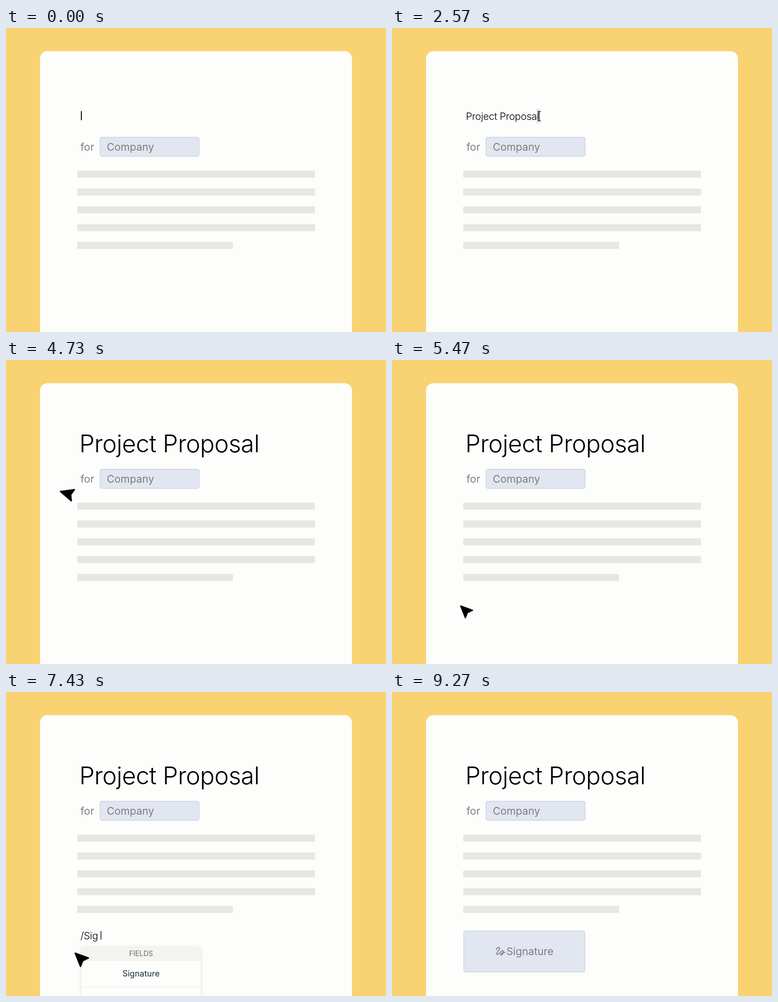
These frames come from a looping animation (837x669 px, 9.31 s). An HTML page:

```html
<!DOCTYPE html>
<html lang="en">
<head>
<meta charset="utf-8">
<title>Proposal editor</title>
<style>
  html, body { margin: 0; width: 100%; height: 100%; overflow: hidden; background: #f9d272; }
  svg { display: block; width: 837px; height: 669px; font-family: Inter, "Open Sans", sans-serif; }
  .grey { fill: #7d7d7d; font-size: 23px; }
  .field { fill: #e1e6f0; stroke: #c5d0e8; stroke-width: 1.3; }
  .navy { fill: #14303f; }
  .line { fill: none; stroke: #14303f; stroke-width: 2; }
  .mid { text-anchor: middle; }
  .typed { font-weight: 300; font-size: 22px; letter-spacing: -.016em; }
  .typed.big { font-size: 53.5px; letter-spacing: -.01em; }

  .anim { animation: 9310ms linear infinite both; }
  #select { fill: #e0e5f0; animation-name: select; }
  #beam { animation-name: beam; }
  #bar { animation-name: bar; }
  #menu { animation-name: menu; }
  #sign { animation-name: sign; }
  #move { animation-name: move; }
  #tilt { animation-name: tilt; }

  /* the selection grows leftwards, then covers the heading */
  @keyframes select {
    0%, 27.17% { x: 326px; y: 178px; width: 0; height: 32px; animation-timing-function: ease-in-out; }
    30.08%, 41.13% { x: 163px; y: 178px; width: 163px; height: 32px; animation-timing-function: step-end; }
    41.14%, 45.64% { x: 163px; y: 152px; width: 403px; height: 66px; animation-timing-function: step-end; }
    45.65%, 100% { x: 163px; y: 152px; width: 0; height: 66px; }
  }
  @keyframes beam {
    0%, 23.6% { opacity: 0; translate: 352px 214px; }
    23.7% { opacity: 1; translate: 352px 214px; animation-timing-function: ease-in-out; }
    26.3%, 27.17% { opacity: 1; translate: 332px 194px; animation-timing-function: ease-in-out; }
    30.08%, 30.7% { opacity: 1; translate: 164px 194px; }
    30.71%, 100% { opacity: 0; translate: 164px 194px; }
  }
  @keyframes bar {
    0%, 29.6% { opacity: 0; translate: 0 6px; animation-timing-function: ease-out; }
    31.5%, 44.2% { opacity: 1; translate: 0 0; }
    45.7%, 100% { opacity: 0; translate: 0 0; }
  }
  @keyframes menu {
    0%, 70.2% { opacity: 0; translate: 0 8px; animation-timing-function: ease-out; }
    72%, 88.4% { opacity: 1; translate: 0 0; }
    89.5%, 100% { opacity: 0; translate: 0 0; }
  }
  @keyframes sign {
    0%, 89.2% { opacity: 0; }
    90.8%, 100% { opacity: 1; }
  }
  @keyframes move {
    0%, 30.7% { opacity: 0; translate: 163px 200px; }
    30.71%, 32.2% { opacity: 1; translate: 163px 200px; animation-timing-function: ease-in; }
    37.59% { translate: 111px 144px; animation-timing-function: ease-out; }
    39.7%, 46.08% { translate: 97px 122px; animation-timing-function: ease-in-out; }
    56.82%, 63.4% { translate: 150px 540px; animation-timing-function: ease-in-out; }
    67.7%, 78.4% { translate: 140px 570px; animation-timing-function: ease-in-out; }
    85.9%, 91% { opacity: 1; translate: 292px 617px; }
    92.8%, 100% { opacity: 0; translate: 292px 617px; }
  }
  @keyframes tilt {
    0%, 39.8% { rotate: 0deg; scale: 1; }
    40.7% { scale: .86; }
    41.8%, 46.08% { rotate: 0deg; scale: 1; animation-timing-function: ease-in-out; }
    50.8% { rotate: -27.5deg; scale: 1; animation-timing-function: ease-in-out; }
    56.82%, 58% { rotate: 0deg; scale: 1; }
    59% { scale: .86; }
    60%, 86.5% { rotate: 0deg; scale: 1; }
    87.6% { scale: .9; }
    88.8%, 100% { rotate: 0deg; scale: 1; }
  }
</style>
</head>
<body>
<svg viewBox="0 0 837 669">
  <defs>
    <filter id="shadow" x="-10%" y="-30%" width="120%" height="170%">
      <feDropShadow dx="0" dy="2" stdDeviation="3" flood-color="#556" flood-opacity=".22"/>
    </filter>
  </defs>

  <rect x="75" y="51" width="687" height="660" rx="16" fill="#fdfdfb"/>
  <g id="lines" fill="#e6e7e5"></g>
  <text class="grey" x="164" y="269.5">for</text>
  <rect class="field" x="207" y="240.5" width="218.5" height="42" rx="4"/>
  <text class="grey" x="222" y="270">Company</text>

  <rect id="select" class="anim"/>
  <text id="title" class="typed"></text>
  <rect id="titleCaret" y="183" width="2" height="20"/>
  <text id="command" class="typed" x="164" y="543.5"></text>
  <rect id="commandCaret" y="526" width="1.5" height="19"/>

  <g id="sign" class="anim">
    <rect class="field" x="158" y="526" width="267" height="90" rx="4"/>
    <path d="M230 567C231 562 237 560 237 564C237 569 229 573 231 577C234 580 240 569 244 569C248 570 243 579 240 579C237 578 242 573 249 573"
      fill="none" stroke="#7d7d7d" stroke-width="2" stroke-linecap="round"/>
    <text class="grey" x="252" y="579">Signature</text>
  </g>

  <g id="menu" class="anim">
    <rect x="166" y="560" width="263" height="160" rx="8" fill="#fdfdfb" filter="url(#shadow)"/>
    <path d="M166 592V568a8 8 0 0 1 8-8H421a8 8 0 0 1 8 8V592Z" fill="#f3f3f0"/>
    <rect x="166" y="648" width="263" height="1.5" fill="#efefed"/>
    <text class="mid" x="297.5" y="581" font-size="15.5" fill="#6c6c6c">FIELDS</text>
    <text class="mid navy" x="297.5" y="626" font-size="18.2">Signature</text>
  </g>

  <g id="bar" class="anim">
    <rect x="53" y="93" width="732" height="53" rx="12" fill="#fdfdfb" filter="url(#shadow)"/>
    <rect x="499" y="93" width="72" height="53" fill="#eddad3"/>
    <g class="mid navy" font-size="20">
      <text x="90" y="126.5" fill="#151515">H1</text>
      <text x="166.5" y="126.5">H2</text>
      <text x="245" y="126.5">H3</text>
      <text x="320" y="124.5" font-size="17" font-weight="800">B</text>
    </g>
    <path class="line" transform="translate(391.5 118)" stroke-width="2.5" d="M-1.5-5h7M-5.5 5h7M2.3-5L-2.3 5"/>
    <path class="line" transform="translate(463 119)" d="M-1.5-4h-3a4 4 0 0 0 0 8h3M1.5-4h3a4 4 0 0 1 0 8h-3M-4 0h8"/>
    <g id="aligns"></g>
    <path class="navy" transform="translate(739 107.5) scale(.92)"
      d="M3.27 5L2 6.27l6.97 6.97L6.5 19h3l1.57-3.66L16.73 21 18 19.73 3.55 5.27zM6 5v.18L8.82 8h2.4l-.72 1.68 2.1 2.1L14.21 8H20V5z"/>
  </g>

  <g id="beam" class="anim">
    <path d="M-3.5-10.5Q0-10.5 0-8.5V8.5Q0 10.5-3.5 10.5M3.5-10.5Q0-10.5 0-8.5M0 8.5Q0 10.5 3.5 10.5"
      fill="none" stroke="#000" stroke-width="1.4"/>
  </g>
  <g id="move" class="anim">
    <g id="tilt" class="anim">
      <path d="M1.5 1.5L30.5 12L18 18L13 30.5Z" stroke="#000" stroke-width="3" stroke-linejoin="round"/>
    </g>
  </g>
</svg>
<script>
  const LOOP = 9310;
  const $ = id => document.getElementById(id);

  function addRect(parent, x, y, width, height) {
    const rect = document.createElementNS("http://www.w3.org/2000/svg", "rect");
    Object.entries({ x, y, width, height }).forEach(([k, v]) => rect.setAttribute(k, v));
    parent.append(rect);
  }

  for (let i = 0; i < 5; i++) addRect($("lines"), 157, 314 + i * 39.2, i < 4 ? 523.5 : 343, 15.5);

  // left, centred and right aligned paragraph icons
  $("aligns").setAttribute("class", "navy");
  [535, 606.5, 678].forEach((cx, side) => {
    for (let i = 0; i < 5; i++) {
      const w = i % 2 ? 12 : 18;
      addRect($("aligns"), cx - 9 + (18 - w) * side / 2, 110 + i * 4, w, 2);
    }
  });

  const typed = (text, t, start, step) =>
    text.slice(0, Math.max(0, Math.floor((t - start) / step) + 1));

  function setText(el, text) {
    if (el.textContent !== text) el.textContent = text;
  }

  function setCaret(caret, label, gap, visible) {
    const width = label.textContent ? label.getComputedTextLength() + gap : 1;
    caret.setAttribute("x", 164 + width);
    caret.style.visibility = visible ? "visible" : "hidden";
  }

  function draw(t) {
    const title = $("title"), command = $("command");
    const big = t >= 3830;
    title.classList.toggle("big", big);
    title.setAttribute("x", big ? 161.5 : 162.7);
    title.setAttribute("y", big ? 202.5 : 202);
    setText(title, typed("Project Proposal", t, 300, 95));
    setCaret($("titleCaret"), title, 1, t < 2200);

    const closed = t >= 8300;
    const slash = t >= 6300 ? "/" : "";
    setText(command, closed ? "" : slash + typed("Sig", t, 6900, 150));
    setCaret($("commandCaret"), command, 6, t >= 5500 && t < 7500);
  }

  let start;
  function frame(now) {
    start ??= now;
    draw((now - start) % LOOP);
    requestAnimationFrame(frame);
  }
  draw(0);
  requestAnimationFrame(frame);
</script>
</body>
</html>
```
